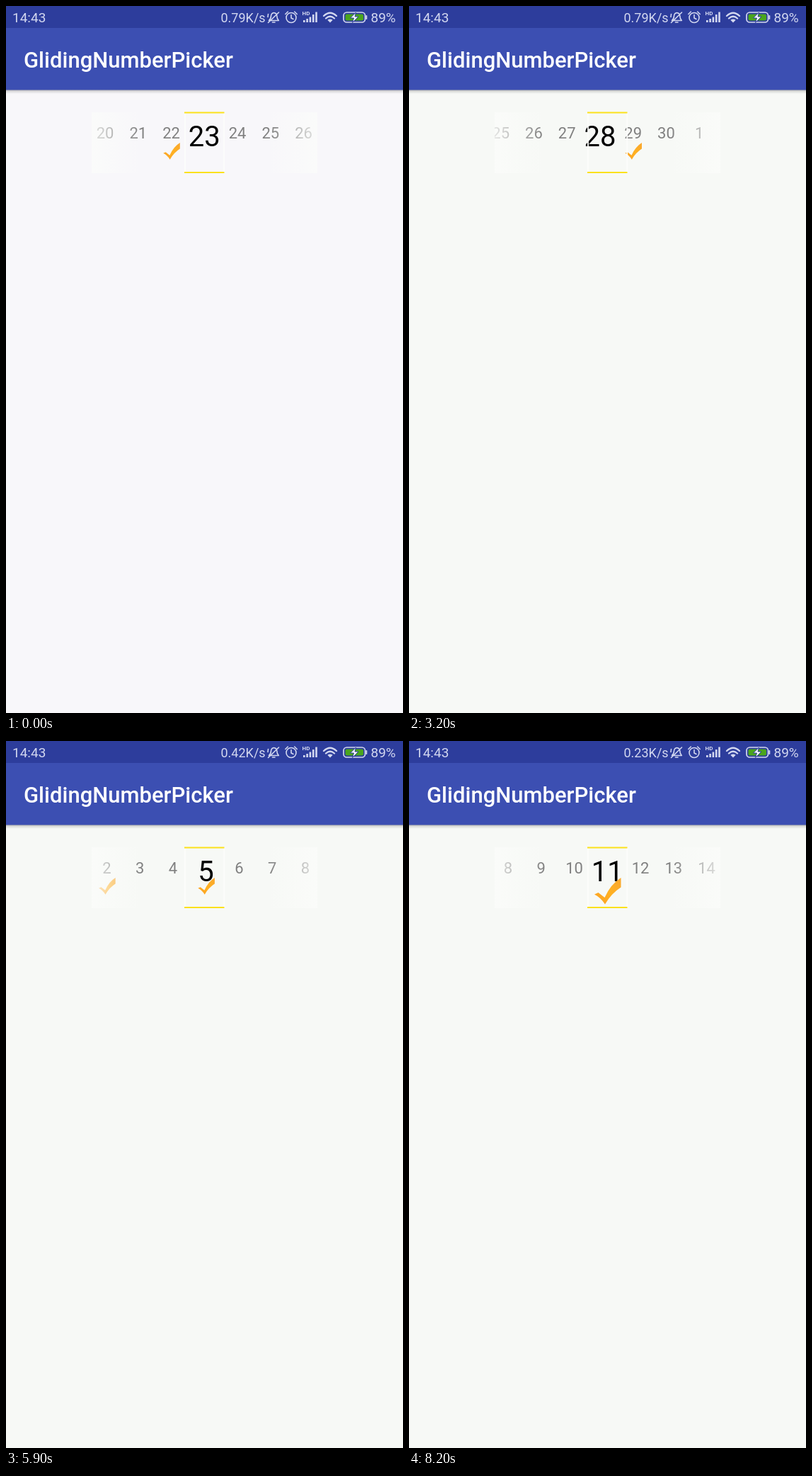
Write an HTML page that moves like this. It is 561 px wide and 998 px high and loops after 10 s.

```html
<!DOCTYPE html>
<html lang="en">
<head>
<meta charset="utf-8">
<title>Number picker</title>
<style>
  html, body { margin: 0; width: 100%; height: 100%; overflow: hidden; background: #f7f9f6; }
  svg { display: block; width: 100vw; height: 100vh; font-family: Roboto, "Noto Sans", sans-serif; }
  .bar { fill: #d3d8f0; font-size: 19px; }
  .line { fill: none; stroke: #d3d8f0; stroke-width: 1.6; stroke-linecap: round; stroke-linejoin: round; }
  .solid { fill: #d3d8f0; }
  .item text { font-size: 22px; fill: #808080; text-anchor: middle; }
  .item.big text { font-size: 40px; fill: #000; }
</style>
</head>
<body>
<svg viewBox="0 0 561 998" preserveAspectRatio="none">
  <defs>
    <linearGradient id="fadeL">
      <stop offset="0" stop-color="#fbfcfa" stop-opacity=".8"/>
      <stop offset="1" stop-color="#fbfcfa" stop-opacity="0"/>
    </linearGradient>
    <linearGradient id="fadeR">
      <stop offset="0" stop-color="#fbfcfa" stop-opacity="0"/>
      <stop offset="1" stop-color="#fbfcfa" stop-opacity=".8"/>
    </linearGradient>
    <linearGradient id="shade" x2="0" y2="1">
      <stop offset="0" stop-color="#000" stop-opacity=".32"/>
      <stop offset=".4" stop-color="#000" stop-opacity=".12"/>
      <stop offset="1" stop-color="#000" stop-opacity="0"/>
    </linearGradient>
    <linearGradient id="amber" x1="1" y1="0" x2="0" y2="1">
      <stop offset="0" stop-color="#f9a72f"/>
      <stop offset=".5" stop-color="#ffb122"/>
      <stop offset="1" stop-color="#fb9f24"/>
    </linearGradient>
    <clipPath id="window"><rect x="121" y="149" width="319" height="88"/></clipPath>
  </defs>

  <rect id="page" width="561" height="998"/>
  <rect y="118" width="561" height="6" fill="url(#shade)"/>
  <rect width="561" height="118.5" fill="#3c4fb2"/>
  <rect width="561" height="31" fill="#2d3d9c"/>
  <text x="25" y="87" font-size="31" font-weight="500" fill="#fff">GlidingNumberPicker</text>

  <text class="bar" x="9" y="23">14:43</text>
  <text class="bar" x="515.5" y="23">89%</text>
  <g id="status">
    <text class="bar" id="speed" x="303.5" y="23" style="font-size:18px"></text>
    <!-- muted bell -->
    <path class="line" d="M371.5 20.5q3-2.5 3-6.500q.5-4 4-4.500q4 .5 4.300 4.500q0 4 2.500 6.500zM376.500 23h3.500M370.500 23.500L385.500 9M370.500 11.500l-.5 4"/>
    <!-- alarm clock -->
    <g class="line">
      <circle cx="403" cy="16.500" r="7"/>
      <path d="M403 12.500v4.500l3 1.500M394.800 11.500l3.500-3.500M411.200 11.500l-3.500-3.500"/>
    </g>
    <!-- signal -->
    <text class="bar" x="418.500" y="13" style="font-size:8px;font-weight:700">HD</text>
    <path class="solid" d="M420 20h2.600v3h-2.600zM424.300 18h2.600v5h-2.600zM428.600 15.500h2.600v7.500h-2.600zM432.900 12h2.600v11h-2.600zM437.200 8.500h2.600v14.500h-2.600z"/>
    <!-- wifi -->
    <g class="line" style="stroke-width:2.300">
      <path d="M449 14q9-8.500 18 0M452 17.500q6-5.500 12 0"/>
    </g>
    <path class="solid" d="M454.300 19.800q3.700-2.800 7.400 0l-3.700 3.700z"/>
    <path id="arrows" class="line" style="stroke-width:1" d="M465.800 23v-3.500l-1 1M468.200 19.500v3.500l1-1"/>
  </g>
  <!-- battery -->
  <rect x="477" y="9" width="30.500" height="14" rx="4.500" fill="none" stroke="#d3d8f0" stroke-width="1.700"/>
  <rect x="479.500" y="11.400" width="25.500" height="9.200" rx="2" fill="#4aa51d"/>
  <rect class="solid" x="508.300" y="13" width="2" height="6" rx="1"/>
  <path d="M494.500 9l-8 8h5l-2 6.500l8.500-8.500h-5z" fill="#fff" stroke="#2d3d9c" stroke-width="1"/>

  <g clip-path="url(#window)">
    <g id="strip"></g>
    <rect x="121" y="150" width="70" height="86" fill="url(#fadeL)"/>
    <rect x="370" y="150" width="70" height="86" fill="url(#fadeR)"/>
  </g>
  <path d="M253 151v84M308.200 151v84" stroke="#fcfdfb" stroke-width="1.800"/>
  <path d="M252 150.500h56.500M252 235h56.500" stroke="#fbe11c" stroke-width="1.900"/>
</svg>

<script>
const LOOP = 10000, TICK = 100, PITCH = 46.75, CENTER = 280.25;
const FIRST = 18, LAST = 46;
const CHECKED = new Set([22, 29, 2, 5, 11]);
const CHECK = "M0 23.500L5.500 21L14.500 28Q23 9 37.500 0V13.500Q24 22 15 37.500Q9 28 0 23.500Z";

// [time, wheel position]; day 31 reads as 1 and so on
const KEYS = [
  [0, 23], [400, 23], [800, 23.3], [1100, 23.86], [1500, 24.95], [1900, 26.25],
  [2300, 27.47], [2600, 28], [3000, 28], [3400, 28.55], [3900, 29],
  [4500, 29], [4900, 30.1], [5400, 33], [5900, 34.95], [6000, 35], [6100, 35],
  [6500, 36.9], [6900, 39.2], [7200, 40], [7500, 40], [7800, 40.5], [8200, 41], [LOOP, 41]
];

const $ = id => document.getElementById(id);
const svg = (tag, attrs, parent) => {
  const el = document.createElementNS("http://www.w3.org/2000/svg", tag);
  for (const name in attrs) el.setAttribute(name, attrs[name]);
  return parent.appendChild(el);
};

const items = [];
for (let k = FIRST; k <= LAST; k++) {
  const day = (k - 1) % 30 + 1;
  const group = svg("g", { class: "item", transform: `translate(${k * PITCH})` }, $("strip"));
  const label = svg("text", {}, group);
  label.textContent = day;
  const check = CHECKED.has(day) ? svg("path", { d: CHECK, fill: "url(#amber)" }, group) : null;
  items.push({ k, group, label, check });
}

const rate = i => (KEYS[i + 1][1] - KEYS[i][1]) / (KEYS[i + 1][0] - KEYS[i][0]);

// harmonic mean keeps the curve from overshooting
function slope(i) {
  if (i === 0 || i === KEYS.length - 1) return 0;
  const a = rate(i - 1), b = rate(i);
  return a * b > 0 ? 2 * a * b / (a + b) : 0;
}

function position(t) {
  let i = 0;
  while (i < KEYS.length - 2 && t >= KEYS[i + 1][0]) i++;
  const [t0, p0] = KEYS[i], [t1, p1] = KEYS[i + 1];
  const span = t1 - t0, u = (t - t0) / span, v = 1 - u;
  return p0 * v * v * (1 + 2 * u) + p1 * u * u * (3 - 2 * u)
    + span * u * v * (slope(i) * v - slope(i + 1) * u);
}

function draw(t) {
  const pos = position(t), near = Math.round(pos);
  const settled = Math.abs(pos - near) < 0.004;
  $("strip").setAttribute("transform", `translate(${CENTER - pos * PITCH})`);
  for (const { k, group, label, check } of items) {
    const big = k === near;
    group.classList.toggle("big", big);
    label.setAttribute("y", big ? 198 : 187);
    if (check) {
      const size = big && settled ? 1 : 0.63;
      check.setAttribute("transform", `translate(${0.5 - 18.75 * size} 193) scale(${size})`);
    }
  }
  const busy = t >= 500 && t < 2700 || t >= 6200 && t < 7900;
  $("arrows").style.visibility = busy ? "visible" : "hidden";
  $("status").setAttribute("transform", `translate(${busy ? -1.7 : 0})`);
  $("speed").textContent = (t < 3300 ? "0.79" : t < 7900 ? "0.42" : "0.23") + "K/s";
  $("page").setAttribute("fill", t < 500 ? "#f8f7fa" : "#f7f9f6");
}

const start = performance.now();
function frame() {
  const t = Math.max(0, performance.now() - start) % LOOP;
  draw(Math.floor(t / TICK) * TICK);
  requestAnimationFrame(frame);
}
frame();
</script>
</body>
</html>
```
